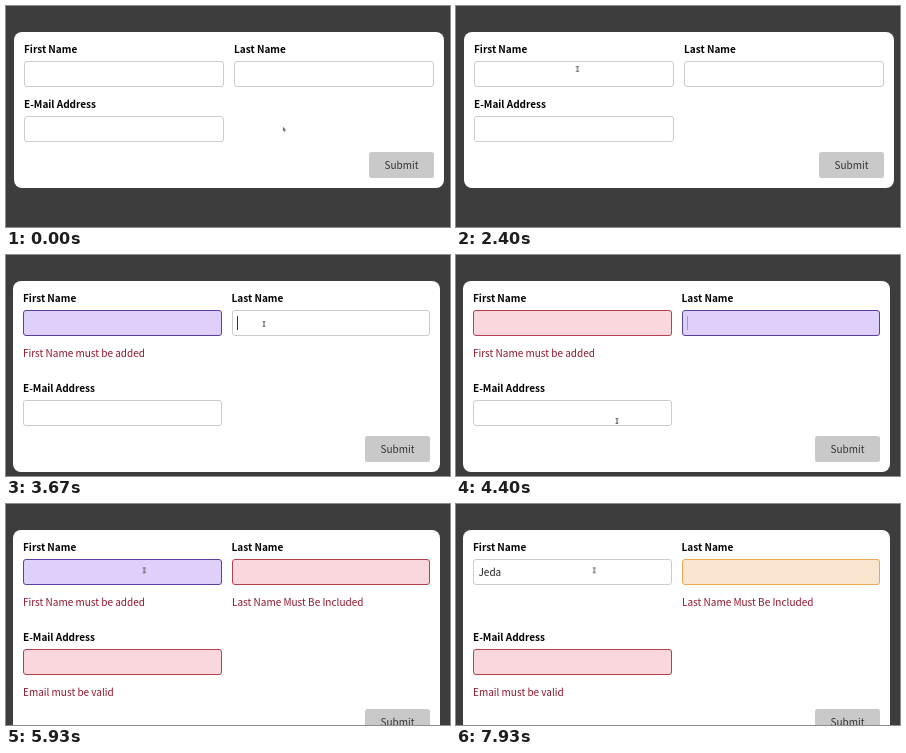
These frames come from a looping animation (444x221 px, 8000 ms). An HTML page:

```html
<!DOCTYPE html>
<html lang="en">
<head>
<meta charset="utf-8">
<title>Form validation</title>
<style>
  html, body { margin: 0; width: 100%; height: 100%; overflow: hidden; }
  body {
    position: relative;
    background: #3d3d3d;
    font: 10px/14px "Noto Sans CJK JP", "Noto Sans CJK SC", "Noto Sans", sans-serif;
    color: #000;
    --line: #ccc;
    --focus: #dfcffb; --focus-line: #5b3f9b;
    --bad: #fad7dc; --bad-line: #b2404d;
    --warn: #f9e5d0; --warn-line: #e9a655;
  }
  .card, .card *, .cursor, .cursor * { animation-duration: 8s; animation-iteration-count: infinite; animation-timing-function: linear; }
  .card {
    position: absolute; left: 8px; top: 25.5px; width: 430px; height: 156.5px;
    border-radius: 8px; background: #fff;
    animation-name: card; animation-timing-function: step-end;
  }
  .group { position: absolute; top: 0; left: 10px; width: calc(50% - 15px); }
  .right { left: auto; right: 10px; }
  .email { top: 55.3px; animation-name: push; animation-timing-function: step-end; }
  label, .error { position: absolute; left: 0; white-space: nowrap; }
  label { top: 10.3px; font-weight: 700; }
  .error { top: 65.7px; color: #92152a; opacity: 0; }
  .field {
    position: absolute; left: 0; top: 29.5px; width: 100%; height: 26px;
    box-sizing: border-box; border: 1px solid var(--line); border-radius: 3px;
    background: #fff; padding-left: 4.5px;
    display: flex; align-items: center; color: #222;
  }
  .field i { width: 1px; height: 14px; background: #333; opacity: 0; }
  .field span { font-size: 0; }
  .error, .field i, .field span { animation-timing-function: step-end; }
  .submit {
    position: absolute; right: 10px; top: 120.5px; width: 65px; height: 26px;
    border-radius: 2.5px; background: #c9c9c9; color: #333;
    line-height: 26px; text-align: center;
    animation-name: submit; animation-timing-function: step-end;
  }

  .first .field { animation-name: first; }
  .last .field { animation-name: last; }
  .email .field { animation-name: email; }
  .first .error { animation-name: first-error; }
  .last .error { animation-name: last-error; }
  .email .error { animation-name: email-error; }
  .first i { animation-name: first-caret; }
  .last i { animation-name: last-caret; }
  .email i { animation-name: email-caret; }
  .first span:nth-child(1) { animation-name: key1; }
  .first span:nth-child(2) { animation-name: key2; }
  .first span:nth-child(3) { animation-name: key3; }
  .first span:nth-child(4) { animation-name: key4; }

  /* layout: the scrollbar narrows the card as error rows appear */
  @keyframes card {
    0% { left: 8px; width: 430px; height: 156.5px; }
    45.875% { left: 7px; width: 427px; height: 191px; }
    66.5%, 100% { left: 7px; width: 427px; height: 215.5px; }
  }
  @keyframes push { 0% { top: 55.3px; } 45.875%, 100% { top: 90px; } }
  @keyframes submit { 0% { top: 120.5px; } 45.875% { top: 155px; } 66.5%, 100% { top: 179.5px; } }

  /* field states */
  @keyframes first {
    0%, 30.375% { background: #fff; border-color: var(--line); }
    33.5%, 45.875% { background: var(--focus); border-color: var(--focus-line); }
    48.375%, 66.5% { background: var(--bad); border-color: var(--bad-line); }
    69%, 96.6% { background: var(--focus); border-color: var(--focus-line); }
    99%, 100% { background: #fff; border-color: var(--line); }
  }
  @keyframes last {
    0%, 45.875% { background: #fff; border-color: var(--line); }
    48.375%, 59.75% { background: var(--focus); border-color: var(--focus-line); }
    62.25%, 96.6% { background: var(--bad); border-color: var(--bad-line); }
    99%, 100% { background: var(--warn); border-color: var(--warn-line); }
  }
  @keyframes email {
    0%, 59.75% { background: #fff; border-color: var(--line); }
    62.25%, 66.5% { background: var(--focus); border-color: var(--focus-line); }
    66.51%, 100% { background: var(--bad); border-color: var(--bad-line); }
  }
  @keyframes first-error { 0% { opacity: 0; } 45.875% { opacity: 1; } 81.6%, 100% { opacity: 0; } }
  @keyframes last-error { 0% { opacity: 0; } 59.75%, 100% { opacity: 1; } }
  @keyframes email-error { 0% { opacity: 0; } 66.5%, 100% { opacity: 1; } }

  /* carets and typing */
  @keyframes first-caret {
    0%, 36.6%, 45.875%, 72.8%, 87.8%, 96.6%, 100% { opacity: 0; }
    30.375%, 66.5%, 79.1%, 90.8% { opacity: 1; }
    42.8% { opacity: .45; }
  }
  @keyframes last-caret { 0%, 59.75%, 100% { opacity: 0; } 45.875% { opacity: 1; } 52.1% { opacity: .35; } }
  @keyframes email-caret { 0%, 66.5%, 100% { opacity: 0; } 59.75% { opacity: 1; } }
  @keyframes key1 { 0% { font-size: 0; } 81.6%, 100% { font-size: 10px; } }
  @keyframes key2 { 0% { font-size: 0; } 90.8%, 100% { font-size: 10px; } }
  @keyframes key3 { 0% { font-size: 0; } 92.45%, 100% { font-size: 10px; } }
  @keyframes key4 { 0% { font-size: 0; } 94.1%, 100% { font-size: 10px; } }

  /* pointer */
  .cursor { position: absolute; left: 0; top: 0; width: 10px; height: 10px; overflow: visible; animation-name: move; }
  .cursor.cursor { animation-timing-function: ease-in-out; }
  .arrow { animation-name: arrow; }
  .beam { animation-name: beam; }
  .cursor .arrow, .cursor .beam { animation-timing-function: step-end; }
  @keyframes move {
    0%, 7.4% { transform: translate(278px, 123.5px); }
    8.3%, 13.3% { transform: translate(278px, 119.7px); }
    15.8%, 24.9% { transform: translate(278.5px, 119.5px); }
    29.8%, 39% { transform: translate(121.5px, 63px); }
    43.9%, 46.5% { transform: translate(258px, 69px); }
    54.4%, 60.5% { transform: translate(161px, 166px); }
    65.5%, 100% { transform: translate(138.3px, 66.3px); }
  }
  @keyframes arrow { 0%, 49.6%, 62.4% { opacity: 1; } 28%, 52.5%, 64.4%, 100% { opacity: 0; } }
  @keyframes beam { 0%, 49.6%, 62.4% { opacity: 0; } 28%, 52.5%, 64.4%, 100% { opacity: 1; } }
</style>
</head>
<body>
  <div class="card">
    <div class="group first">
      <label>First Name</label>
      <div class="field"><span>J</span><span>e</span><span>d</span><span>a</span><i></i></div>
      <div class="error">First Name must be added</div>
    </div>
    <div class="group right last">
      <label>Last Name</label>
      <div class="field"><i></i></div>
      <div class="error">Last Name Must Be Included</div>
    </div>
    <div class="group email">
      <label>E-Mail Address</label>
      <div class="field"><i></i></div>
      <div class="error">Email must be valid</div>
    </div>
    <div class="submit">Submit</div>
  </div>
  <svg class="cursor">
    <path class="arrow" d="M-1-2.5V1.6L0 .8 .7 2.3 1.3 2 .7.6H2Z" fill="#555" stroke="#999" stroke-width=".3"/>
    <path class="beam" d="M-1.4-2.3H1.4M0-2.3V2.3M-1.4 2.3H1.4" fill="none" stroke="#444" stroke-width=".9"/>
  </svg>
</body>
</html>
```
